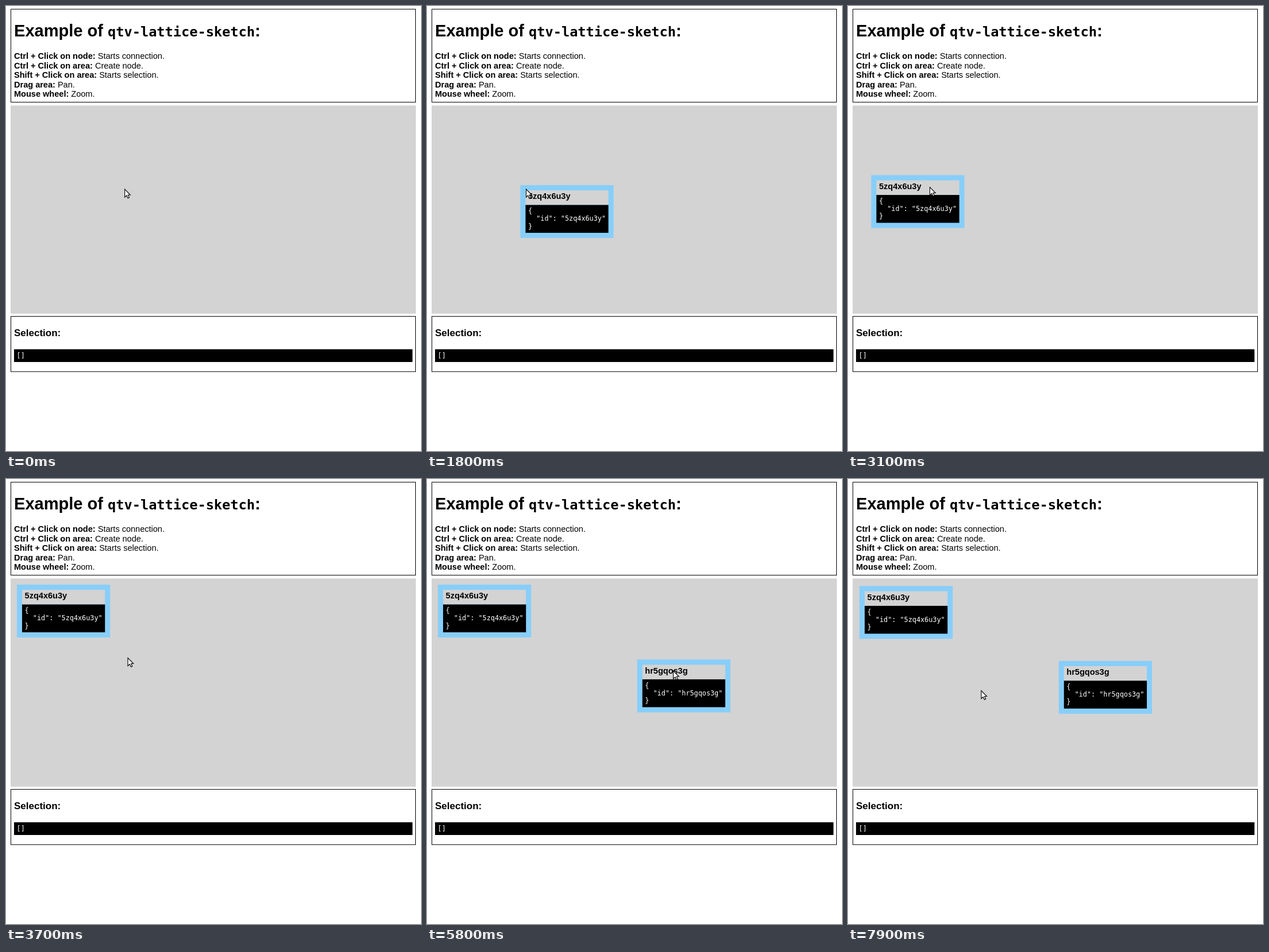
Write an HTML page with a canvas that moves like this. It is 722 px wide and 775 px high and loops after 8000 ms.

```html
<!DOCTYPE html>
<html lang="en">
<head>
<meta charset="utf-8">
<title>Diagram editor</title>
<style>
  html, body { margin: 0; width: 100%; height: 100%; overflow: hidden; background: #fff; }
  canvas { display: block; }
</style>
</head>
<body>
<canvas id="stage" width="722" height="775"></canvas>
<script>
const ctx = document.getElementById('stage').getContext('2d');
const LOOP = 8000, STEP = 100;
const ZOOM = 0.908; // page zoom: text is set in unzoomed CSS pixels
const SANS = '"Liberation Sans", Arial, sans-serif';
const MONO = '"DejaVu Sans Mono", monospace';
const BOLD = `bold 16px ${SANS}`, PLAIN = `16px ${SANS}`, CODE = `13px ${MONO}`;
const BORDER = 9, PADDING = 4.6, LINE = 13.15;

const help = [
  ['Ctrl + Click on node:', 'Starts connection.'],
  ['Ctrl + Click on area:', 'Create node.'],
  ['Shift + Click on area:', 'Starts selection.'],
  ['Drag area:', 'Pan.'],
  ['Mouse wheel:', 'Zoom.']
];

const easeOut = k => k * (2 - k);
const mix = (a, b, k) => a + (b - a) * k;

// A point that rests, then eases to each new place in 100 ms steps.
function path(x, y) {
  const legs = [];
  return {
    to(start, steps, toX, toY) {
      legs.push({ start, steps, toX, toY });
      return this;
    },
    at(t) {
      let px = x, py = y;
      for (const leg of legs) {
        if (t < leg.start) break;
        const done = Math.floor((t - leg.start) / STEP) + 1;
        const k = easeOut(Math.min(1, done / leg.steps));
        px = mix(px, leg.toX, k);
        py = mix(py, leg.toY, k);
      }
      return [px, py];
    }
  };
}

const spotA = [162.4, 312], spotB = [365.7, 314.4];
const GRAB = 2800, DROP = 3700, PAN = 7900;

const nodeA = path(...spotA)
  .to(GRAB, 1, 290.2, 283.2)
  .to(2900, 1, 107.4, 291)
  .to(3100, 1, 40.4, 294.6)
  .to(3200, 2, 107.4, 283.8)
  .to(DROP, 1, 19, 184);

const nodes = [
  { id: '5zq4x6u3y', born: 1200, path: nodeA },
  { id: 'hr5gqos3g', born: 5000, path: path(...spotB) }
];

const freeCursor = path(206.6, 319)
  .to(700, 4, ...spotA)
  .to(1800, 1, 172.5, 319)
  .to(1900, 6, 260, 340)
  .to(DROP, 1, 212, 311.5)
  .to(3800, 2, 291, 313)
  .to(4200, 2, 324, 305)
  .to(4500, 3, ...spotB)
  .to(5500, 4, 428.5, 334)
  .to(7400, 2, 225, 369)
  .to(PAN, 1, 231.8, 368.5);

// While dragging, the pointer rides on the node and slips a little to the right.
function cursorAt(t) {
  if (t < GRAB || t >= DROP) return freeCursor.at(t);
  const [x, y] = nodeA.at(t);
  const slip = Math.min(3, Math.floor((t - GRAB) / STEP));
  return [x + 84 + 6 * slip, y + 26 - 1.7 * slip];
}

function rect(x, y, w, h, color) {
  ctx.fillStyle = color;
  ctx.fillRect(x, y, w, h);
}

function panel(y, h) {
  ctx.strokeStyle = '#000';
  ctx.lineWidth = 1;
  ctx.strokeRect(8.5, y, 704, h);
}

// Draws text on a baseline and returns the x where it ends.
function text(str, x, y, font, color = '#000') {
  ctx.save();
  ctx.translate(x, y);
  ctx.scale(ZOOM, ZOOM);
  ctx.font = font;
  ctx.fillStyle = color;
  ctx.fillText(str, 0, 0);
  const end = x + ctx.measureText(str).width * ZOOM;
  ctx.restore();
  return end;
}

function drawPage() {
  rect(0, 0, 722, 775, '#fff');

  panel(5.5, 162);
  const heading = `bold 32px ${SANS}`;
  let x = text('Example of ', 14, 52.6, heading);
  x = text('qtv-lattice-sketch', x, 52.6, `bold 26px ${MONO}`);
  text(':', x, 52.6, heading);
  help.forEach(([keys, action], i) => {
    const y = 92 + i * 16.5;
    text(action, text(keys + ' ', 14, y, BOLD), y, PLAIN);
  });

  rect(8, 173.3, 705, 362.5, '#d3d3d3');

  panel(540.5, 96.3);
  text('Selection:', 14, 575.3, `bold 18.72px ${SANS}`);
  rect(14, 597.8, 693.2, 22.2, '#000');
  text('[]', 14 + PADDING, 612.6, CODE, '#fff');
}

function drawNode(id, x, y) {
  const inner = x + BORDER, left = inner + PADDING;
  rect(x, y, 162.2, 92, '#87cefa');
  rect(inner, y + BORDER, 144.2, 25.5, '#d3d3d3');
  rect(inner, y + 34.5, 144.2, 48.5, '#000');
  text(id, left, y + 24.2, BOLD);
  ['{', `  "id": "${id}"`, '}'].forEach((line, i) =>
    text(line, left, y + 49.2 + i * LINE, CODE, '#fff'));
}

const arrow = new Path2D('M0 0V14L3.3 11L5.5 15.8L7.8 14.8L5.7 10H9.7Z');

function drawCursor(x, y) {
  ctx.save();
  ctx.translate(x, y);
  ctx.fillStyle = '#fff';
  ctx.fill(arrow);
  ctx.strokeStyle = '#000';
  ctx.lineWidth = 1.1;
  ctx.stroke(arrow);
  ctx.restore();
}

function render(t) {
  drawPage();
  const [panX, panY] = t < PAN ? [0, 0] : [1, 2.4];
  for (const node of nodes) {
    if (t < node.born) continue;
    const [x, y] = node.path.at(t);
    drawNode(node.id, x + panX, y + panY);
  }
  drawCursor(...cursorAt(t));
}

const begin = performance.now();
function tick() {
  render((performance.now() - begin) % LOOP);
  requestAnimationFrame(tick);
}
tick();
</script>
</body>
</html>
```
